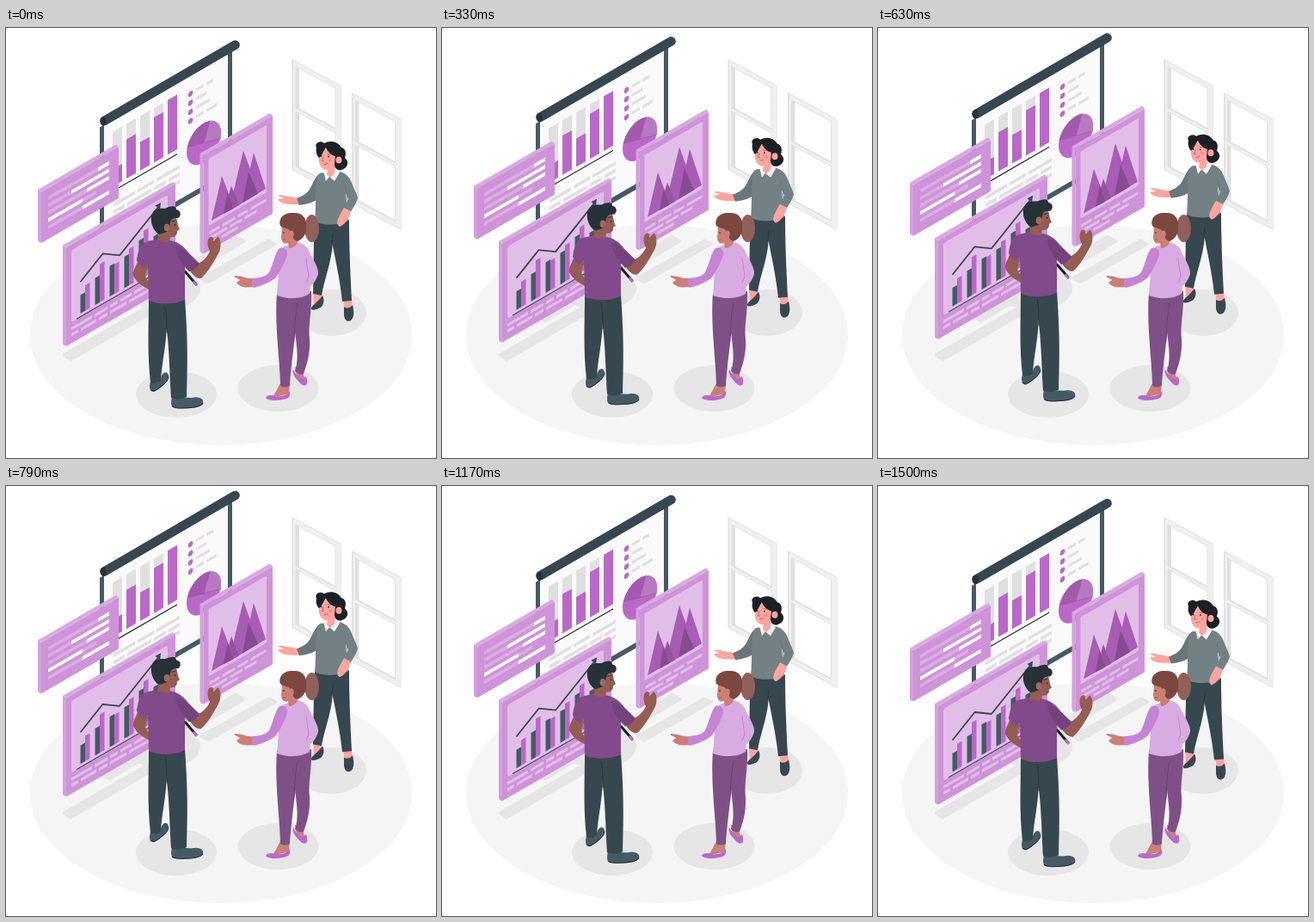
Write an HTML page that moves like this. It is 500 by 500 pixels and loops after 1540 ms.

```html
<!DOCTYPE html>
<html lang="en">
<head>
<meta charset="utf-8">
<title>Team presentation</title>
<style>
  html, body { margin: 0; width: 100%; height: 100%; overflow: hidden; background: #fff; }
  svg { display: block; width: 100vw; height: 100vh; }
</style>
</head>
<body>
<svg id="stage" viewBox="0 0 500 500"></svg>
<script>
const PERIOD = 1540, RISE = 10, LEAD = 40;
const DARK = '#37474f', SLATE = '#455a64', NIGHT = '#263238', INK = '#1b2026', PURPLE = '#ba68c8',
      PLUM = '#814a8b', LILAC = '#ce93d8', PALE = '#e1bee7', GREY = '#e0e0e0', SHADE = '#e6e6e6';

const path = (d, fill, extra = '') => `<path d="${d}" fill="${fill}" ${extra}/>`;
const line = (d, color, width) =>
  path(d, 'none', `stroke="${color}" stroke-width="${width}" stroke-linecap="round" stroke-linejoin="round"`);
const oval = (x, y, rx, ry, fill) => `<ellipse cx="${x}" cy="${y}" rx="${rx}" ry="${ry}" fill="${fill}"/>`;
const rect = (x, y, w, h, fill, r = 0) =>
  `<rect x="${x}" y="${y}" width="${w}" height="${h}" rx="${r}" fill="${fill}"/>`;
// Wall plane: x stays in stage pixels, y is sheared.
const wall = (x, y, body, angle = -30) => `<g transform="translate(${x} ${y}) skewY(${angle})">${body}</g>`;
// Row of text blocks given as start/end pairs.
const row = (v, h, fill, ...ends) => {
  let out = '';
  for (let i = 0; i < ends.length; i += 2) out += rect(ends[i], v, ends[i + 1] - ends[i], h, fill);
  return out;
};

function panel(x, y, w, h, body) {
  const rise = w * 0.577;
  return path(`M${x} ${y}l-4 -2.5v${h - 1}q0 2 4 3.5z`, '#d4a0de') +
    path(`M${x} ${y}l-4 -2.5l${w} ${-rise}q2 -1 4 2.5z`, '#d9a9e2') +
    wall(x, y, rect(0, 0, w, h, LILAC, 1) + body);
}

function win(x, y) {
  const pane = (v, h) => rect(4, v, 47, h, GREY) + rect(8.5, v + 1, 41.5, h - 3, '#fff');
  return wall(x, y, rect(0, 0, 57.5, 129, GREY, 1) + rect(1.5, 1, 55.5, 127, '#f0f0f0') +
    pane(6, 49) + pane(58, 65), 28.3);
}

function screen() {
  const tops = [57.5, 32, 44.5, 25, 14];
  let body = rect(-6, 0, 154, 144, SLATE) + rect(-1, 0, 144, 137.5, '#fafafa');
  tops.forEach((top, i) => {
    body += rect(9 + 16 * i, 14, 11, 63.5, GREY) + rect(9 + 16 * i, top, 11, 77.5 - top, PURPLE);
  });
  body += rect(9, 82.5, 75, 1.3, INK);
  [[106, 115, 118, 126], [106, 118], [106, 122], [106, 115, 118, 130]].forEach((ends, i) => {
    body += oval(99.5, 22 + 10.5 * i, 2.8, 3.2, PURPLE) + row(19.5 + 10.3 * i, 3.6, GREY, ...ends);
  });
  body += row(97.5, 4, GREY, 10, 35, 38, 57, 60, 87) + row(106, 4, GREY, 10, 23, 26, 54, 57, 71, 74, 87) +
    row(114.5, 4, GREY, 10, 40, 43, 66, 69, 87) + row(123, 4, GREY, 10, 28, 31, 52);
  body += oval(115, 88, 20, 23, PURPLE) +
    path('M115 88L122 66.5A20 23 0 0 0 96 82Z', '#a259ae') +
    path('M115 88L122 66.5A20 23 0 0 1 134.5 94Z', '#b679c2') +
    line('M122 66.5L115 88L134.5 94M115 88L96 82', '#97529f', .5);
  return wall(115, 112, body) + line('M114.5 108L266.5 19.7', DARK, 10.7) + oval(113.3, 108.5, 3.5, 5.3, NIGHT);
}

function textPanel() {
  const white = [[66, 79], [35, 79], [53, 79], [8, 48], [48, 79]];
  return panel(41, 190.5, 90, 59.5, white.map((ends, i) =>
    row(10 + 8.5 * i, 4.2, '#daaee2', 8, i == 3 ? 64 : 79) + row(10 + 8.5 * i, 4.2, '#fafafa', ...ends)).join(''));
}

function barPanel() {
  const tops = [[65, 57], [55, 42], [51, 52], [50, 44], [41, 33], [46, 38]];
  let body = rect(6, 7, 112, 84, PALE, 3);
  tops.forEach(([dark, light], i) => {
    const u = 16.5 + 17 * i;
    body += rect(u, dark, 5.5, 86.5 - dark, SLATE) + rect(u + 5.5, light, 5.5, 86.5 - light, PURPLE);
  });
  body += rect(12, 89.7, 100, 1.2, DARK) +
    row(96.5, 3.6, PALE, 6, 30, 33, 48, 51, 60, 63, 76, 79, 104) +
    row(103.5, 3.6, PALE, 6, 14, 17, 35, 38, 48, 51, 70, 73, 96);
  return panel(70, 255, 127, 115, body) +
    line('M87 294.5L112.5 262.5L132 264.5L178 207', DARK, 1.8) + path('M180 203l-1 8l-5.5 -4.5z', DARK);
}

function peakPanel() {
  const body = rect(6, 7, 67.5, 78, PALE, 1) +
    row(92, 3.4, PALE, 7, 19, 22, 37, 40, 52, 55, 73) +
    row(98.5, 3.4, PALE, 7, 28, 31, 45, 48, 62) + row(105, 3.4, PALE, 7, 18, 21, 40);
  return panel(229.5, 148.5, 80.5, 114, body) +
    path('M239 224L251 172L265 209Z', '#a85cb5') +
    path('M259 213L276 142.5L294 192Z', '#a85cb5') +
    path('M275 203L288 145L302 187Z', '#a85cb5') +
    path('M275 203L282 167L293 192.5Z', '#864b90') +
    path('M253 216L262 183.5L271 206Z', '#97539f') +
    path('M253 216L257.5 191L264 210Z', '#864b90');
}

function presenter() {
  const skin = '#fca59f', knit = '#748184';
  return path('M357 307L367 309L366 318L358 323Z', skin) +
    path('M392 314L402 314L403 327L394 327Z', skin) +
    path('M368 311C371 317 369 322 366 325C361 327 358 329 355 327C354 323 362 320 368 311Z', DARK) +
    path('M393 324C396 327 401 325 403 322C405 330 405 337 401 340C396 343 393 338 393 333Z', DARK) +
    path('M359 225L382 228L380 250C378 275 370 292 367 311L357 309C358 285 357 260 359 225Z', DARK) +
    path('M367 228L399 223C399 250 400 280 402 317L391 318C388 290 383 270 379 248Z', DARK) +
    line('M380 240L379 252', NIGHT, .8) +
    path('M340 198L330 196C326 196 320 193 316 195L323 198L316 199C319 205 329 206 342 205Z', skin) +
    path('M366 168.500C359 172 357 182 352 189C348 194 343 196 338 198L341 206C350 205 357 203 364 198Z', '#69767a') +
    path('M366 168.500L387 167C394 168 399 172 402 180C405 188 408 193 409 198C407 205 403 210 400 215L392 211L398 199L395 192L398 224C388 230 368 230 359 225C361 205 359 185 362 174Z', knit) +
    line('M394 183L396 193L397 201', '#657276', .8) +
    path('M393 209L401 213C399 221 395 228 388 231C384 229 385 224 387 220C389 216 391 212 393 209Z', skin) +
    path('M369 166L383 163L388 168L382 178L376 173L372 178Z', '#f5f5f5') +
    path('M365 142C363 151 363 159 368 163C370 165 373 165 374 165L373 170L377 174L382 169L383 157L386 145C380 138 370 138 365 142Z', skin) +
    path('M361 139C358 134 366 130 370 134C377 130 386 132 390 139C395 140 396 146 394 151C400 156 397 163 390 165C385 166 382 163 382 158L383 149C378 148 374 144 372 139C369 143 367 149 364 151C361 148 360 143 361 139Z', INK) +
    oval(387, 153.5, 3.5, 4, skin) + oval(366.5, 149, .8, 1.1, INK) + oval(375, 149.5, .8, 1.1, INK) +
    oval(377, 154, 2.2, 1.7, '#f58d89') +
    line('M369 150L367.5 154.5L369.5 155M370 158.5Q372 159 374 157.5M374 146.5L377 147', '#a34848', .7);
}

function man() {
  const skin = '#945c52';
  return path('M168 411C166 417 167 423 172 423C178 420 190 412 189 404C187 398 182 400 180 407Z', SLATE) +
    line('M168 421Q173 424 180 417Q189 411 189 406', INK, .8) +
    path('M193 429C191 437 192 442 198 442C210 443 226 442 229 437C231 431 224 428 216 430Z', SLATE) +
    line('M193 440Q197 443 207 442Q224 442 229 437', INK, .8) +
    path('M166 314L187 318L187 345C186 372 181 390 180 410Q174 415 168 412C164 380 166 345 166 314Z', DARK) +
    path('M178 319L208 314C210 345 212 370 210 429Q201 433 192 430C190 400 190 360 184 335Z', DARK) +
    line('M185 324C187 333 187 345 187 354', NIGHT, .8) +
    line('M208 283L221 298', INK, 3) + line('M218.5 295.5L221 298.5', PURPLE, 3) +
    path('M153 272C150 279 147 284 148 288C152 296 158 300 166 304L166 295C161 291 161 286 166 277Z', skin) +
    path('M212 279C216 287 222 292 227 291C234 285 241 273 246 264C250 258 251 249 247 243C244 244 243 247 241 248C242 244 240 241 236 244C233 250 235 255 237 260C234 266 229 272 223 274Z', skin) +
    path('M160 250C168 246 174 247 178 245L191 247C201 249 207 254 212 261L225 274Q221 281 213 283L208 278L208 316C196 322 178 322 166 317L165 275L160 279Q154 276 152 270C153 262 155 254 160 250Z', PLUM) +
    path('M197 254C205 255 211 261 225 274Q221 281 213 283C206 275 198 267 197 254Z', '#75427e') +
    path('M180 228L198 221C200 226 199 229 202 234L199 236C199 241 196 244 191 243L190 249Q183 250 176 247Z', skin) +
    path('M178 240C168 234 166 217 173 212C177 208 184 211 187 209C192 207 198 206 198 211C204 212 204 219 200 221C195 221 192 222 191 226L190 231L187 237Z', NIGHT) +
    oval(187, 232, 3.3, 4.3, '#a06a5e') + oval(196.5, 229, .7, 1.1, INK) + line('M193 225L197 224', INK, .8) +
    line('M196 239L198.5 239', '#5d3930', .7);
}

function colleague() {
  const skin = '#cc7f76', hair = '#7c4741', top = '#d8abe2', trousers = '#7f5088';
  return path('M319 413L330 413L329 425L318 428L311 428Z', skin) +
    path('M336 394L345 398L347 408L338 405Z', skin) +
    path('M330 422C331 428 329 431 322 432C314 434 304 433 302 430C304 426 310 427 315 428C322 429 327 426 330 422Z', PURPLE) +
    path('M334 397C332 402 337 408 342 413C346 417 351 417 350 410C350 405 348 404 347 407C341 408 337 403 334 397Z', PURPLE) +
    path('M330 311L355 306C356 330 351 345 353 362C354 380 349 393 346 402Q341 404 336 399C341 385 338 370 335 345Z', trousers) +
    path('M315 308L341 313C339 340 332 385 330 416Q324 419 319 416C319 390 312 345 315 308Z', trousers) +
    line('M339 320C336 330 336 350 334.5 365', '#693b72', .8) +
    path('M288 291C280 292 275 288 266 288C264 290 270 291 272 293L268 296C272 302 280 302 289 301Z', skin) +
    oval(355.5, 233, 8.5, 16, '#91605a') +
    path('M323 254L338 249C346 250 351 255 353 261C358 270 364 281 363 286C361 293 357 298 354 300L353 309C342 316 325 315 315 311L317 285C317 270 318 258 323 254Z', top) +
    line('M349 268L352 289L349 296', '#b97bc6', .8) +
    path('M318 256C325 254 329 259 326 267C324 273 318 285 313 291C305 297 296 300 288 302Q284 297 287 291C297 290 302 289 306 284C311 274 313 261 318 256Z', '#c684d4') +
    path('M322 228C320 233 321 238 320 242C320 248 322 252 328 250L329 256Q335 256 339 250L338 236L331 228Z', skin) +
    path('M319 230C316 220 325 214 334 215C343 214 350 220 349 230C350 239 346 245 339 248C335 247 333 245 334 239L330 236C329 232 323 234 319 230Z', hair) +
    oval(331.5, 239.5, 3.2, 4, skin) + oval(323, 238, .6, 1, INK) + line('M322 246L324.5 246', '#8f4a42', .7);
}

const strip = d => path(d, SHADE, `stroke="${SHADE}" stroke-width="3" stroke-linejoin="round"`);
const scenery = oval(250, 357, 222, 128, '#f5f5f5') +
  oval(198, 426, 47, 27, SHADE) + oval(316.5, 419, 47, 27, SHADE) + oval(378, 331, 41, 27, SHADE) +
  oval(182, 303, 44, 25, SHADE) +
  strip('M67 380L196 306L205 311L75 386Z') +
  strip('M111 336L267 242L277 248L120 341Z') +
  strip('M226 291L305 247L314 251L235 296Z') +
  win(332.5, 36) + win(402, 75);

const stage = document.getElementById('stage');
stage.innerHTML = scenery +
  `<g id="floating">${screen() + textPanel() + barPanel() + peakPanel() + presenter() + man()}</g>` + colleague();
const floating = document.getElementById('floating');

function draw(now) {
  const phase = ((now + LEAD) % PERIOD) / PERIOD;
  const lift = RISE * (1 - Math.abs(1 - 2 * phase));
  floating.setAttribute('transform', `translate(0 ${(0.5 - lift).toFixed(3)})`);
  requestAnimationFrame(() => draw(performance.now()));
}
draw(0);
</script>
</body>
</html>
```
